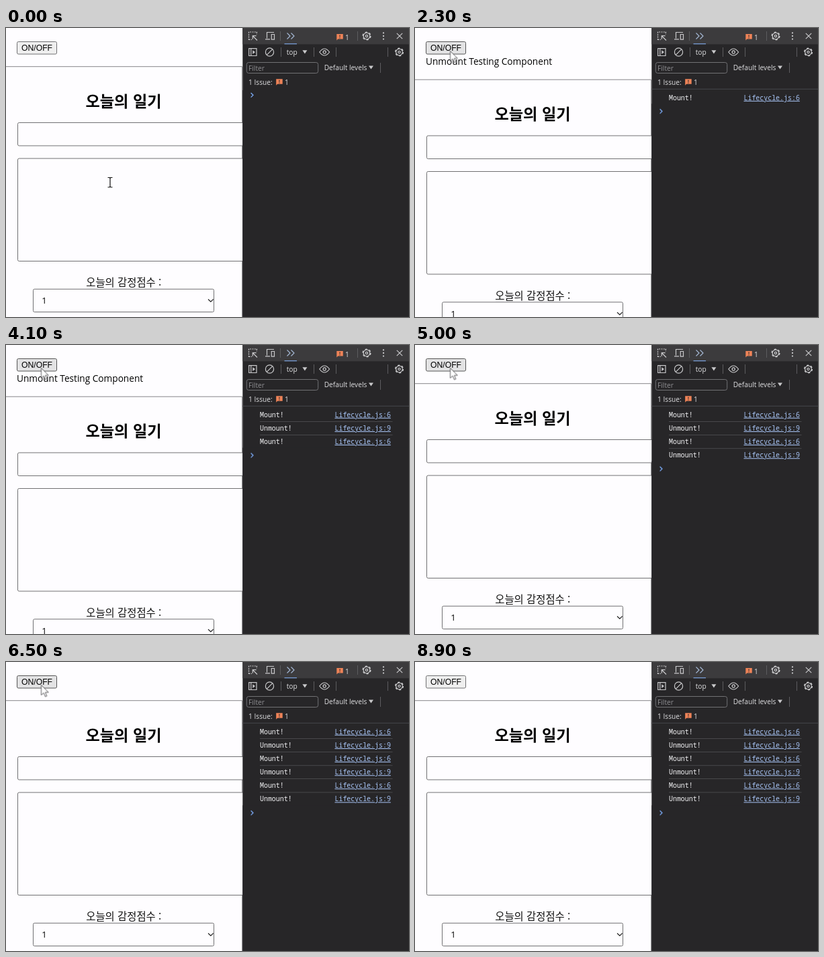
An HTML page for the animation above (9000 ms loop, 600 by 432 pixels).

```html
<!DOCTYPE html>
<html lang="ko">
<head>
<meta charset="utf-8">
<title>Mount and unmount</title>
<style>
  html, body { margin: 0; width: 100%; height: 100%; overflow: hidden; background: #fefdff; }
  svg { display: block; width: 100vw; height: 100vh; }
  text { white-space: pre; }
  .ko { font-family: "Noto Sans CJK KR", "Noto Sans CJK", sans-serif; text-anchor: middle; }
  .ui { font: 10.2px "Open Sans", "Noto Sans", sans-serif; fill: #e0e0e2; }
  .mono { font: 500 9.93px "Noto Sans Mono", "DejaVu Sans Mono", monospace; fill: #f2f2f4; }
  .link { fill: #a9c6f8; text-decoration: underline; }
  .box { fill: #fefdff; stroke: #707072; }
  .icon { fill: none; stroke: #c9c9cb; stroke-width: 1.2; }
  .blue { fill: none; stroke: #7cacf8; stroke-width: 1.3; }
  .tab { fill: none; stroke: #a9bddb; stroke-width: 1.1; }
  .sep { fill: none; stroke: #5c5c5f; }
  .row { fill: none; stroke: #48484b; }

  #page { animation: toggle 9s step-end infinite; }
  #label { opacity: var(--on); }
  #diary { transform: translateY(calc(var(--on) * 19.5px)); }
  @keyframes toggle {
    0%, 34.6%, 53.3%, 70%, 100% { --on: 0; }
    20%, 43.3%, 62.8% { --on: 1; }
  }

  #tail { animation: log 9s step-end infinite; transform: translateY(calc(var(--rows) * 20.2px)); }
  #prompt { animation: settle 9s step-end infinite; }
  @keyframes log {
    0%, 100% { --rows: 0; }
    21% { --rows: 1; }
    35.7% { --rows: 2; }
    44.4% { --rows: 3; }
    54.4% { --rows: 4; }
    63.9% { --rows: 5; }
    71.1% { --rows: 6; }
  }
  @keyframes settle {
    0%, 100% { transform: none; }
    21% { transform: translateY(4px); }
  }

  #rule { animation: rule 9s step-end infinite; }
  @keyframes rule { 0%, 100% { opacity: 0; } 1% { opacity: 1; } }

  #button { animation: hover 9s step-end infinite; }
  @keyframes hover {
    0%, 80.6%, 100% { fill: #efefef; stroke: #707072; }
    14.5% { fill: #e3e3e4; stroke: #555; }
  }

  #cursor { animation: move 9s linear infinite; }
  @keyframes move {
    0%, 2.2% { transform: translate(155px, 230px); }
    10% { transform: translate(79px, 94px); animation-timing-function: ease-out; }
    15.6%, 80% { transform: translate(52.5px, 34.5px); animation-timing-function: ease-in; }
    85.5%, 100% { transform: translate(58px, -30px); }
  }
  #beam { animation: beam 9s step-end infinite; }
  #arrow { animation: arrow 9s step-end infinite; }
  @keyframes beam { 0% { opacity: 1; } 7.3%, 100% { opacity: 0; } }
  @keyframes arrow { 0% { opacity: 0; } 7.3%, 100% { opacity: 1; } }
</style>
</head>
<body>
<svg viewBox="0 0 600 432">
  <defs>
    <g id="gear" class="icon">
      <circle r="4.8"/>
      <circle r="5.8" stroke-width="1.6" stroke-dasharray="3 3.07"/>
      <circle r="1.7"/>
    </g>
    <g id="issue">
      <path d="M0 0H9.5V7.5H2L0 9.5Z" fill="#ee8358"/>
      <path d="M4.75 1.4V4.3M4.75 5.2V6.4" stroke="#38302e" stroke-width="1.2"/>
    </g>
    <path id="drop" d="M0 0H7L3.5 5.2Z" fill="#c9c9cb"/>
    <g id="pair">
      <text class="mono" x="378" y="107.8">Mount!</text>
      <text class="mono link" x="489.5" y="107.8">Lifecycle.js:6</text>
      <path class="row" d="M378 114.5H575.5"/>
      <text class="mono" x="378" y="128">Unmount!</text>
      <text class="mono link" x="489.5" y="128">Lifecycle.js:9</text>
    </g>
  </defs>

  <g id="page">
    <rect width="353" height="432" fill="#fefdff"/>
    <rect id="button" x="16.5" y="20.5" width="59" height="18.5" rx="2"/>
    <text x="23" y="34" font-family="Liberation Sans, Arial, sans-serif" font-size="12.2">ON/OFF</text>
    <text id="label" x="16" y="55.3" font-family="Open Sans, Noto Sans, sans-serif" font-size="13.65">Unmount Testing Component</text>
    <g id="diary">
      <path d="M0 57.7H351.6V440" fill="none" stroke="#868688"/>
      <text class="ko" x="175" y="117.6" font-size="23.2" font-weight="700">오늘의 일기</text>
      <rect class="box" x="17.5" y="141.5" width="350" height="34.5" rx="2"/>
      <rect class="box" x="17.5" y="195" width="350" height="153.5" rx="2"/>
      <text class="ko" x="175.3" y="386.4" font-size="15.4" fill="#111">오늘의 감정점수 :</text>
      <rect class="box" x="40.5" y="390.3" width="269" height="34.2" rx="2"/>
      <text x="53.3" y="412" font-family="Open Sans, Noto Sans, sans-serif" font-size="13">1</text>
      <path d="M301 405.5L304.8 409.2L308.6 405.5" fill="none" stroke="#222" stroke-width="1.2"/>
    </g>
  </g>

  <g id="console">
    <rect x="352.3" width="248" height="432" fill="#272628"/>
    <rect x="352.3" width="248" height="24.3" fill="#3c3b3d"/>
    <path class="sep" d="M408.5 5V19M523.5 5V19M409.5 29V43M458.5 29V43M491.5 29V43M568.5 29V43M557.5 52V67"/>

    <!-- tab bar -->
    <path class="icon" d="M361.5 18V6H374" stroke-dasharray="2 1.4"/>
    <path class="icon" d="M373.3 6V10M361.5 17.4H366" stroke-dasharray="2 1.4"/>
    <path class="icon" d="M374 18.5L367.5 12M367.3 16.8V11.7H372.6"/>
    <path class="icon" d="M399 6.5H388.5V15.5M386 16.8H393M395.3 9.5H399.5V17.2H395.3Z"/>
    <path class="tab" d="M418.5 7.5L423 12L418.5 16.5M424.5 7.5L429 12L424.5 16.5"/>
    <rect x="414.5" y="23" width="18.5" height="1.3" fill="#7599d2"/>
    <use href="#issue" x="492.3" y="9"/>
    <text class="ui" x="505" y="17.8">1</text>
    <use href="#gear" x="537" y="12"/>
    <path d="M562 7.4h.01M562 12h.01M562 16.6h.01" stroke="#c9c9cb" stroke-width="2.3" stroke-linecap="round"/>
    <path class="icon" d="M581.8 7.8L590.2 16.2M590.2 7.8L581.8 16.2"/>

    <!-- console bar -->
    <path class="icon" d="M361.7 30.7H373V41.5H361.7ZM364.8 30.7V41.5"/>
    <path d="M367.3 33.2L371 36.1L367.3 39Z" fill="#c9c9cb"/>
    <circle class="icon" cx="392.5" cy="36" r="6.1"/>
    <path class="icon" d="M388.2 40.3L396.8 31.7"/>
    <text class="ui" x="417.7" y="39.8">top</text>
    <use href="#drop" x="441.4" y="33.2"/>
    <path class="icon" d="M466.8 36Q474.2 26 481.6 36Q474.2 46 466.8 36Z"/>
    <circle class="icon" cx="474.2" cy="36" r="2.1"/>
    <use href="#gear" x="585.5" y="36"/>

    <!-- filter bar -->
    <rect x="358.3" y="51.5" width="106.4" height="16" rx="3" fill="none" stroke="#727275"/>
    <text class="ui" x="361" y="63.8" style="fill:#8f8f92">Filter</text>
    <text class="ui" x="473.7" y="63.3">Default levels</text>
    <use href="#drop" x="540" y="56.4"/>
    <text class="ui" x="361" y="85">1 Issue:</text>
    <use href="#issue" x="402.2" y="76.3"/>
    <text class="ui" x="415" y="85">1</text>
    <path id="rule" class="row" d="M352.3 91.3H600"/>

    <!-- log rows, hidden below the moving tail -->
    <use href="#pair"/>
    <use href="#pair" y="40.2"/>
    <use href="#pair" y="80.4"/>
    <path class="row" d="M378 134.5H575.5M378 174.5H575.5"/>
    <g id="tail">
      <rect x="352.3" y="93" width="248" height="340" fill="#272628"/>
      <path id="prompt" class="blue" d="M364.6 97L368 100.3L364.6 103.6"/>
    </g>
  </g>

  <g id="cursor">
    <path id="beam" d="M-3.5 -6.5H-1L0 -5.5L1 -6.5H3.5M0 -5.5V7M-3.5 8H-1L0 7L1 8H3.5" fill="none" stroke="#111" stroke-width="1.2"/>
    <path id="arrow" d="M0 0V15L3.6 11.7L6 17.3L8.3 16.3L6 10.9H10.8Z" fill="#fff" stroke="#4a4a4c" stroke-width=".9"/>
  </g>
</svg>
</body>
</html>
```
